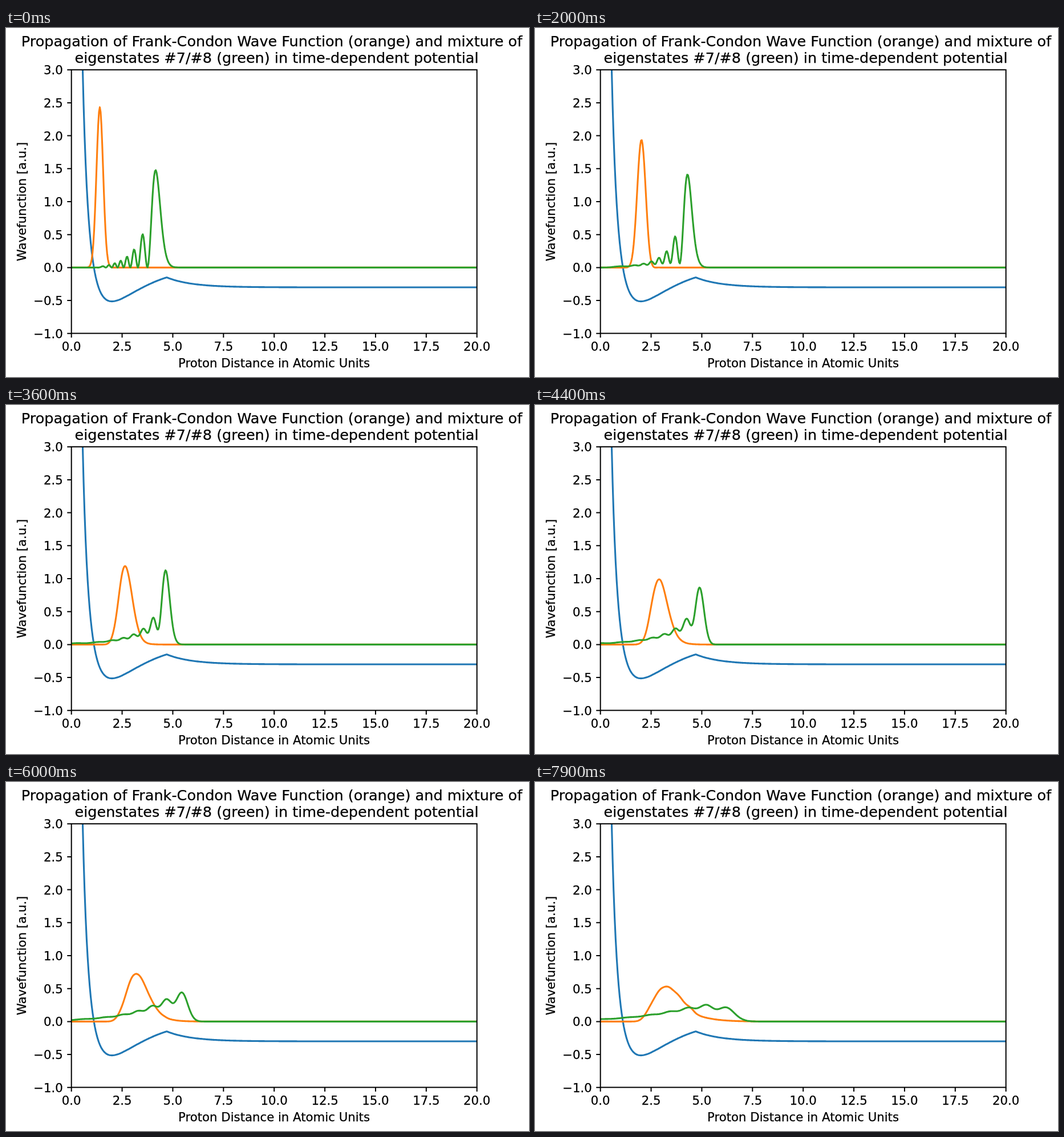
Animation of 917 by 611 pixels, one loop 8 s. Source, as an HTML page:

```html
<!DOCTYPE html>
<html lang="en">
<head>
<meta charset="utf-8">
<title>Wave packet propagation</title>
<style>
  html, body { margin: 0; width: 100%; height: 100%; overflow: hidden; background: #fff; }
  svg { display: block; width: 917px; height: 611px; }
  text { font-family: "DejaVu Sans", sans-serif; font-size: 21.25px; fill: #000; stroke: #000; stroke-width: 0.25px; }
  .title { font-size: 25.5px; }
  .mid { text-anchor: middle; }
  .end { text-anchor: end; }
  .axis { fill: none; stroke: #000; stroke-width: 2; }
  .curve { fill: none; stroke-width: 3.1; stroke-linejoin: round; }
</style>
</head>
<body>
<svg viewBox="0 0 917 611">
  <defs><clipPath id="plot"><rect x="114.7" y="73.2" width="711" height="461.4"/></clipPath></defs>
  <g clip-path="url(#plot)">
    <path id="potential" class="curve" stroke="#1f77b4"/>
    <path id="orange" class="curve" stroke="#ff7f0e"/>
    <path id="green" class="curve" stroke="#2ca02c"/>
  </g>
  <rect class="axis" x="114.7" y="73.2" width="711" height="461.4"/>
  <path id="ticks" class="axis"/>
  <g id="labels"></g>
  <text class="title mid" x="466" y="32">Propagation of Frank-Condon Wave Function (orange) and mixture of</text>
  <text class="title mid" x="474.5" y="60.5">eigenstates #7/#8 (green) in time-dependent potential</text>
  <text class="mid" x="470" y="594">Proton Distance in Atomic Units</text>
  <text class="mid" transform="translate(35 304) rotate(-90)">Wavefunction [a.u.]</text>
</svg>
<script>
const FRAMES = 80, STEP = 100;
const el = id => document.getElementById(id);
const px = x => 114.7 + x * 35.55;
const py = y => 419.4 - y * 115.4;

function plot(id, f, from, to, dx) {
  let d = "";
  for (let i = 0; i <= Math.round((to - from) / dx); i++) {
    const x = from + i * dx;
    d += (i ? "L" : "M") + px(x).toFixed(2) + " " + py(f(x)).toFixed(2);
  }
  if (to < 20) d += `L${px(20)} ${py(0)}`;
  el(id).setAttribute("d", d);
}

function drawAxes() {
  let ticks = "", labels = "";
  for (let i = 0; i <= 8; i++) {
    const x = px(i * 2.5), y = py(i / 2 - 1);
    const name = (i / 2 - 1).toFixed(1).replace("-", "\u2212");
    ticks += `M${x} 534.6v7.4M114.7 ${y}h-7.4`;
    labels += `<text class="mid" x="${x}" y="565">${(i * 2.5).toFixed(1)}</text>`
            + `<text class="end" x="99.8" y="${y + 7.9}">${name}</text>`;
  }
  el("ticks").setAttribute("d", ticks);
  el("labels").innerHTML = labels;
}

// Cubic Hermite through [x, y] points
function spline(points) {
  const last = points.length - 1;
  const slope = i => {
    const a = points[Math.max(i - 1, 0)], b = points[i], c = points[Math.min(i + 1, last)];
    const left = i > 0 ? (b[1] - a[1]) / (b[0] - a[0]) : 0;
    const right = i < last ? (c[1] - b[1]) / (c[0] - b[0]) : 0;
    return (left * (c[0] - b[0]) + right * (b[0] - a[0])) / (c[0] - a[0]) || left + right;
  };
  return x => {
    let i = 0;
    while (i < last - 1 && x > points[i + 1][0]) i++;
    const [x0, y0] = points[i], [x1, y1] = points[i + 1];
    const w = x1 - x0, u = (x - x0) / w, r = 1 - u;
    return r * r * (1 + 2 * u) * y0 + u * u * (3 - 2 * u) * y1
         + w * u * r * (r * slope(i) - u * slope(i + 1));
  };
}

// Molecular ion: nuclear repulsion plus electronic energy, in hartree
const electronic = spline([[0.4, -1.3008], [0.6, -1.1715], [0.8, -1.0545], [1, -0.9518], [1.2, -0.8623],
  [1.4, -0.7843], [1.6, -0.7159], [1.8, -0.6558], [2, -0.6026], [2.5, -0.4938], [3, -0.4109],
  [3.5, -0.3466], [4, -0.2961], [4.5, -0.2562], [5, -0.2244], [6, -0.1787], [8, -0.1276], [10, -0.1006]]);

function bond(x) {
  const r = Math.max(x, 0.4);
  return r > 10 ? 0 : 1 / r + electronic(r);
}
const ENERGY_SCALE = 5;
const lowered = x => x < 4.7 ? bond(x) : -0.06 + (bond(4.7) + 0.06) * Math.exp((4.7 - x) / 1.23);

// Grid, reduced mass and time step in atomic units
const LEFT = -8, DX = 0.02, N = 1101, MASS = 918, DT = 0.5, STEPS_PER_FRAME = 10;
const HOP = 1 / (2 * MASS * DX * DX);
const grid = f => Float64Array.from({ length: N }, (_, i) => f(LEFT + i * DX));

// Returns a solver of (H - z) y = b for complex z, overwriting b with y
function resolvent(V, zr, zi) {
  const qr = new Float64Array(N), qi = new Float64Array(N);
  for (let i = 0, pr = 0, pi = 0; i < N; i++) {
    const dr = 2 * HOP + V[i] - zr - HOP * HOP * pr, di = -zi - HOP * HOP * pi;
    const n = dr * dr + di * di;
    qr[i] = pr = dr / n;
    qi[i] = pi = -di / n;
  }
  return (re, im) => {
    for (let i = 0, pr = 0, pi = 0; i < N; i++) {
      const r = re[i] + HOP * pr, m = im[i] + HOP * pi;
      re[i] = pr = r * qr[i] - m * qi[i];
      im[i] = pi = r * qi[i] + m * qr[i];
    }
    for (let i = N - 2; i >= 0; i--) {
      const r = re[i + 1], m = im[i + 1];
      re[i] += HOP * (r * qr[i] - m * qi[i]);
      im[i] += HOP * (r * qi[i] + m * qr[i]);
    }
  };
}

function normalise(psi) {
  const norm = Math.sqrt(psi.reduce((sum, v) => sum + v * v, 0) * DX);
  return psi.map(v => v / norm);
}

// Number of levels below E (Sturm sequence)
function levelsBelow(V, E) {
  let count = 0, d = Infinity;
  for (let i = 0; i < N; i++) {
    d = 2 * HOP + V[i] - E - HOP * HOP / d;
    if (d < 0) count++;
  }
  return count;
}

// Level by bisection, state by inverse iteration, outer lobe positive
function eigenstate(V, index) {
  let low = -0.11, high = 0;
  for (let i = 0; i < 40; i++) {
    const E = (low + high) / 2;
    if (levelsBelow(V, E) > index) high = E; else low = E;
  }
  const solve = resolvent(V, high + 1e-8, 0);
  let psi = grid(x => x > 1 && x < 5 ? x : 0);
  for (let i = 0; i < 4; i++) {
    solve(psi, new Float64Array(N));
    psi = normalise(psi);
  }
  const sign = Math.sign(psi[Math.round((4.4 - LEFT) / DX)]);
  return psi.map(v => v * sign);
}

// Crank-Nicolson propagation; one density per frame
function propagate(psi, V) {
  const re = normalise(psi), im = new Float64Array(N), densities = [];
  const solve = resolvent(V, 0, 2 / DT);
  for (let frame = 0; frame < FRAMES; frame++) {
    densities.push(re.map((v, i) => v * v + im[i] * im[i]));
    for (let s = 0; s < STEPS_PER_FRAME; s++) {
      const a = im.map(v => v * 2 / DT), b = re.map(v => -v * 2 / DT);
      solve(a, b);
      for (let i = 0; i < N; i++) {
        re[i] = 2 * a[i] - re[i];
        im[i] = 2 * b[i] - im[i];
      }
    }
  }
  return densities;
}

const bondGrid = grid(bond);
const seventh = eigenstate(bondGrid, 7), eighth = eigenstate(bondGrid, 8);
const gaussian = grid(x => Math.exp(-(((x - 1.4) / 0.164) ** 2) / 4));
const waves = {
  orange: propagate(gaussian, grid(lowered)),
  green: propagate(seventh.map((v, i) => v + eighth[i]), grid(() => 0)),
};

let shown = -1;
function render(ms) {
  const frame = Math.floor(ms / STEP) % FRAMES;
  if (frame === shown) return;
  shown = frame;
  for (const id in waves) {
    const density = waves[id][frame];
    plot(id, x => density[Math.round((x - LEFT) / DX)], 0, 10, 0.04);
  }
}

drawAxes();
plot("potential", x => ENERGY_SCALE * lowered(x), 0.4, 20, 0.05);
const start = performance.now();
function loop() {
  render(Math.max(0, performance.now() - start));
  requestAnimationFrame(loop);
}
loop();
</script>
</body>
</html>
```
